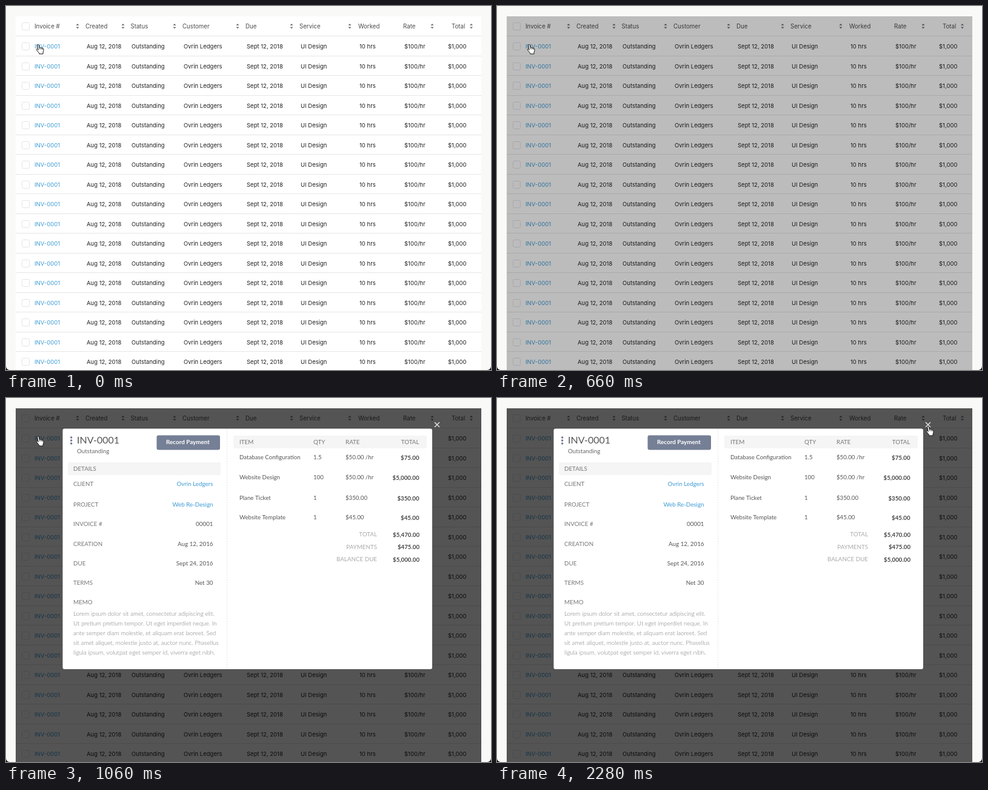
An HTML page with a canvas for the animation above (2300 ms loop, 800 px wide and 600 px high).

```html
<!DOCTYPE html>
<html lang="en">
<head>
<meta charset="utf-8">
<title>Invoice detail</title>
<style>
  html, body { margin: 0; width: 100%; height: 100%; overflow: hidden; background: #f9f9f7; }
  canvas { display: block; width: 800px; height: 600px; }
</style>
</head>
<body>
<canvas id="stage" width="800" height="600"></canvas>
<script>
const ctx = document.getElementById('stage').getContext('2d');
const LOOP = 2300, STEP = 20;
const CLIENT = 'Ovrin Ledgers';
const BLUE = '#3d9bd4';

const COLUMNS = [
  { title: 'Invoice #', x: 47, sort: 118, value: 'INV-0001', cellX: 47 },
  { title: 'Created', x: 131, sort: 193, value: 'Aug 12, 2018', cellX: 133 },
  { title: 'Status', x: 205.5, sort: 278, value: 'Outstanding', cellX: 207 },
  { title: 'Customer', x: 291, sort: 382, value: CLIENT, cellX: 293 },
  { title: 'Due', x: 395, sort: 471, value: 'Sept 12, 2018', cellX: 397 },
  { title: 'Service', x: 484, sort: 567, value: 'UI Design', cellX: 486 },
  { title: 'Worked', x: 581, value: '10 hrs', cellX: 583 },
  { title: 'Rate', x: 655, sort: 703, value: '$100/hr', cellX: 657 },
  { title: 'Total', x: 735, sort: 767.5, value: '$1,000', cellX: 729 }
];

const DETAILS = [
  ['CLIENT', CLIENT, 145, BLUE],
  ['PROJECT', 'Web Re-Design', 179, BLUE],
  ['INVOICE #', '00001', 211],
  ['CREATION', 'Aug 12, 2016', 244],
  ['DUE', 'Sept 24, 2016', 276],
  ['TERMS', 'Net 30', 308]
];

const MEMO = [
  'Lorem ipsum dolor sit amet, consectetur adipiscing elit.',
  'Ut pretium pretium tempor. Ut eget imperdiet neque. In',
  'ante semper diam molestie, et aliquam erat laoreet. Sed',
  'sit amet aliquet, molestie justo at, auctor nunc. Phasellus',
  'ligula ipsum, volutpat eget semper id, viverra eget nibh.'
];

const ITEMS = [
  ['Database Configuration', '1.5', '$50.00 /hr', '$75.00', 101],
  ['Website Design', '100', '$50.00 /hr', '$5,000.00', 133.5],
  ['Plane Ticket', '1', '$350.00', '$350.00', 167.5],
  ['Website Template', '1', '$45.00', '$45.00', 199.5]
];

const TOTALS = [
  ['TOTAL', '$5,470.00', 228],
  ['PAYMENTS', '$475.00', 248.5],
  ['BALANCE DUE', '$5,000.00', 269]
];

const inter = (size, weight = 400) => `${weight} ${size}px Inter, sans-serif`;
const lato = (size, weight = 400) => `${weight} ${size}px Lato, sans-serif`;

function bezier(a, b, t) {
  return 3 * (1 - t) * (1 - t) * t * a + 3 * (1 - t) * t * t * b + t * t * t;
}

// Same curve as the CSS "ease" keyword.
function ease(time, start, duration) {
  const p = (time - start) / duration;
  if (p <= 0) return 0;
  if (p >= 1) return 1;
  let lo = 0, hi = 1;
  for (let i = 0; i < 24; i++) {
    const mid = (lo + hi) / 2;
    if (bezier(0.25, 0.25, mid) < p) lo = mid; else hi = mid;
  }
  return bezier(0.1, 1, lo);
}

function text(str, x, y, font, color, align = 'left') {
  ctx.font = font;
  ctx.fillStyle = color;
  ctx.textAlign = align;
  ctx.fillText(str, x, y);
}

function box(x, y, w, h, radius, fill, stroke) {
  ctx.beginPath();
  ctx.roundRect(x, y, w, h, radius);
  if (fill) { ctx.fillStyle = fill; ctx.fill(); }
  if (stroke) { ctx.strokeStyle = stroke; ctx.lineWidth = 1; ctx.stroke(); }
}

function sortArrows(x, y) {
  ctx.fillStyle = '#777';
  for (const dir of [-1, 1]) {
    ctx.beginPath();
    ctx.moveTo(x - 2.5, y + dir * 1.3);
    ctx.lineTo(x + 2.5, y + dir * 1.3);
    ctx.lineTo(x, y + dir * 4.3);
    ctx.fill();
  }
}

function drawTable() {
  ctx.fillStyle = '#f9f9f7';
  ctx.fillRect(0, 0, 800, 600);
  ctx.fillStyle = '#fff';
  ctx.fillRect(16, 17, 768, 583);

  box(26.5, 27.5, 12, 12, 2, '#fff', '#e4e4e4');
  for (const col of COLUMNS) {
    text(col.title, col.x, 37, inter(9.7), '#4c4c4c');
    if (col.sort) sortArrows(col.sort, 33.2);
  }
  for (let row = 0; row < 17; row++) {
    const y = Math.round(66 + row * 32.53);
    ctx.fillStyle = '#e6e6e6';
    ctx.fillRect(16, y - 17, 768, 1);
    box(26.5, y - 5.5, 12, 12, 2, '#fff', '#e4e4e4');
    COLUMNS.forEach((col, i) =>
      text(col.value, col.cellX, y + 3.5, inter(9.5), i ? '#222' : BLUE));
  }
}

function drawSummary() {
  ctx.fillStyle = '#6f7890';
  for (const y of [65, 70, 75]) {
    ctx.beginPath();
    ctx.arc(107.7, y, 1.7, 0, 7);
    ctx.fill();
  }
  text('INV-0001', 117, 75, lato(16), '#555');
  text('Outstanding', 117, 91, lato(9.8), '#666');
  box(248.5, 61.5, 104.5, 24, 3, '#757f95');
  text('Record Payment', 300, 76, lato(9.9, 700), '#fff', 'center');

  box(102, 106, 252, 21, 2, '#f5f5f5');
  text('DETAILS', 111, 120, lato(9.8), '#777');
  for (const [label, value, y, color = '#555'] of DETAILS) {
    text(label, 111, y, lato(9.8), '#777');
    text(value, 341.5, y, lato(9.8), color, 'right');
  }
  text('MEMO', 111, 339.5, lato(9.8), '#777');
  MEMO.forEach((line, i) => text(line, 111, 359 + i * 16, lato(9.9, 300), '#777'));
}

function drawItems() {
  const grey = '#777';
  box(375, 62, 319, 21, 2, '#f5f5f5');
  text('ITEM', 385, 76, lato(9.8), grey);
  text('QTY', 507, 76, lato(9.8), grey);
  text('RATE', 560, 76, lato(9.8), grey);
  text('TOTAL', 681.5, 76, lato(9.8), grey, 'right');
  for (const [name, qty, rate, total, y] of ITEMS) {
    text(name, 385, y, lato(9.7), '#555');
    text(qty, 507, y, lato(9.7), '#555');
    text(rate, 560, y, lato(9.7), '#555');
    text(total, 681.5, y + 1, lato(9.7, 700), '#444', 'right');
  }
  for (const [label, value, y] of TOTALS) {
    text(label, 612, y, lato(9.8), '#aaa', 'right');
    text(value, 682, y + 0.5, lato(9.7, 700), '#444', 'right');
  }
}

function drawModal() {
  box(93.5, 50.5, 609.5, 396.5, 3, '#fff');
  ctx.strokeStyle = '#e6e6e6';
  ctx.lineWidth = 1;
  ctx.setLineDash([2, 2]);
  ctx.beginPath();
  ctx.moveTo(364.5, 51);
  ctx.lineTo(364.5, 447);
  ctx.stroke();
  ctx.setLineDash([]);

  drawSummary();
  drawItems();

  ctx.strokeStyle = '#e8e8e8';
  ctx.lineWidth = 1.4;
  ctx.beginPath();
  ctx.moveTo(707, 40);
  ctx.lineTo(715, 48);
  ctx.moveTo(715, 40);
  ctx.lineTo(707, 48);
  ctx.stroke();
}

const HAND = new Path2D(
  'M2.3 1.6 C2.3 .2 4.7 .2 5 1.6 L5.8 6 C6 5 8 5 8.2 6.2 ' +
  'C8.6 5.5 10.2 5.8 10.4 6.9 C11 6.4 12.3 6.9 12.4 8 ' +
  'C12.7 10 12.4 11.5 11.6 13.2 L11.5 16 L5.4 16 L5 14.4 ' +
  'C3.6 13 2.6 11.4 1 9.6 C.2 8.4 1.6 7.4 2.7 8.4 L3.7 9.4 Z');
const KNUCKLES = new Path2D('M5.8 6 L6.1 8.4 M8.2 6.4 L8.4 8.6 M10.4 7 L10.5 9');

function drawHand(x, y) {
  ctx.save();
  ctx.translate(x, y);
  ctx.fillStyle = '#fff';
  ctx.strokeStyle = '#111';
  ctx.lineJoin = 'round';
  ctx.lineWidth = 1;
  ctx.fill(HAND);
  ctx.stroke(HAND);
  ctx.lineWidth = 0.8;
  ctx.stroke(KNUCKLES);
  ctx.restore();
}

function drawCorners() {
  ctx.fillStyle = '#111';
  ctx.beginPath();
  ctx.rect(0, 590, 800, 10);
  ctx.roundRect(0, 560, 800, 40, [0, 0, 6, 6]);
  ctx.save();
  ctx.clip('evenodd');
  ctx.fillRect(0, 594, 800, 6);
  ctx.restore();
}

function render(time) {
  drawTable();

  ctx.fillStyle = `rgba(0, 0, 0, ${0.67 * ease(time, 580, 330)})`;
  ctx.fillRect(16, 17, 768, 583);

  ctx.globalAlpha = ease(time, 758, 290);
  if (ctx.globalAlpha > 0) drawModal();
  ctx.globalAlpha = 1;

  const move = ease(time, 1060, 460);
  drawHand(49.5 + 658 * move, 63 - 17 * move);
  drawCorners();
}

function tick() {
  const time = performance.now() % LOOP;
  render(Math.floor(time / STEP) * STEP);
  requestAnimationFrame(tick);
}
tick();
</script>
</body>
</html>
```
